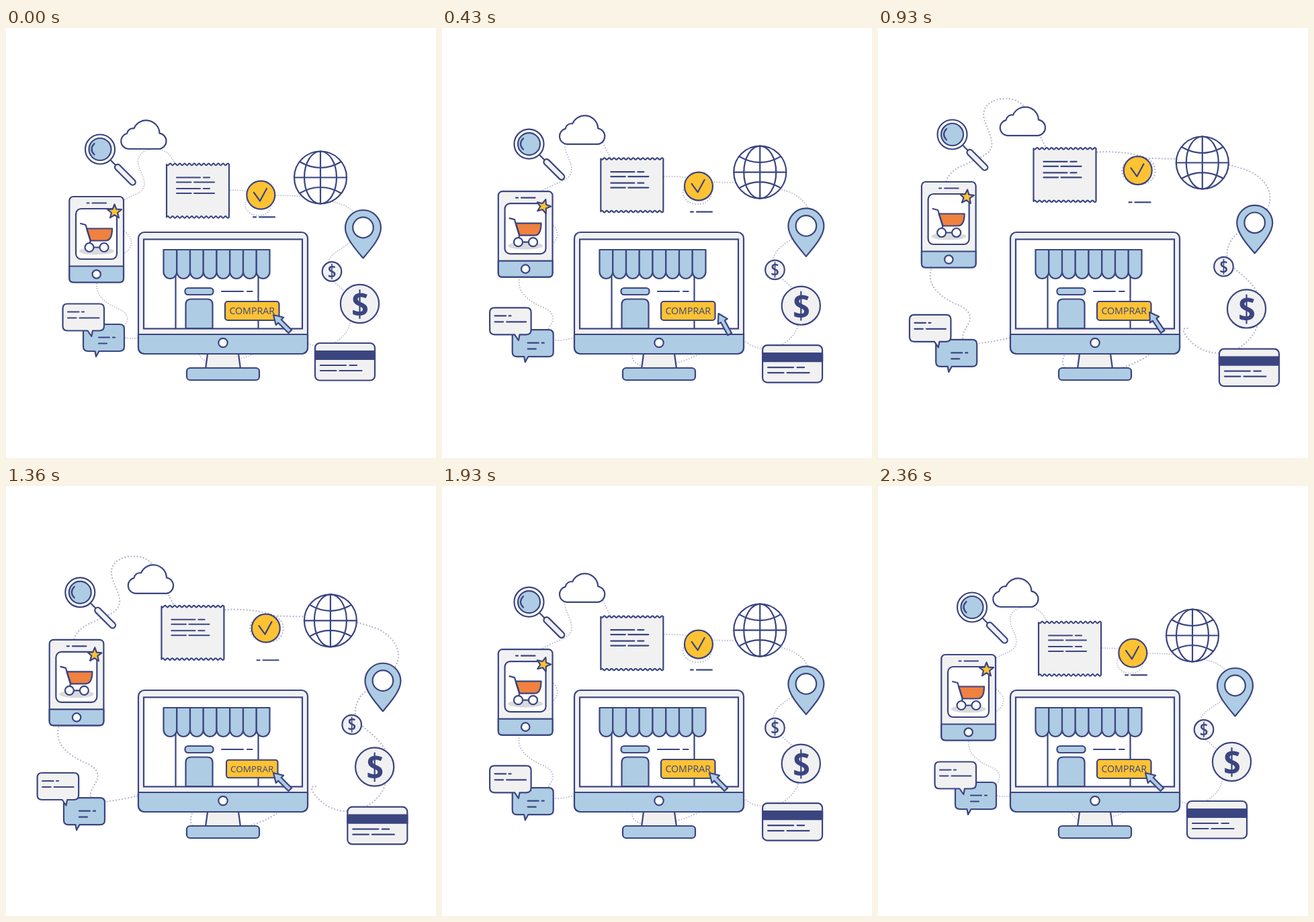
Recreate the animation shown at these times as an HTML page. Size 640 by 640 pixels, loop 2430 ms.

```html
<!DOCTYPE html>
<html lang="pt">
<head>
<meta charset="utf-8">
<title>Comprar</title>
<style>
html, body { margin: 0; width: 100%; height: 100%; overflow: hidden; background: #fff; }
svg { display: block; width: 100vw; height: 100vh; }
.ink { fill: none; stroke: #3b4580; stroke-width: 2.2; stroke-linecap: round; stroke-linejoin: round; }
.b { fill: #aecce3; }
.g { fill: #f1f1f2; }
.w { fill: #fff; }
.y { fill: #fec233; }
.o { fill: #f0813f; }
.navy { fill: #3b4580; }
text { fill: #3b4580; stroke: none; text-anchor: middle; font-family: "Open Sans", "Noto Sans", sans-serif; }
</style>
</head>
<body>
<svg viewBox="0 0 640 640">
  <path id="trail" fill="none" stroke="#b9bad2" stroke-width="2.4" stroke-linecap="round" stroke-dasharray="0 4.6"
    d="M461 447C452 446 455 453 460 460C472 475 488 484 508 484C522 484 530 482 537 477C555 466 566 450 566 435
    C566 415 570 400 562 388C552 374 540 365 530 357C516 345 518 328 528 313C540 298 568 288 579 270
    C592 248 580 226 555 213C535 205 520 202 500 199C480 196 460 194 443 194L400 193C385 192.5 368 194 364 207
    C360 222 376 236 398 231C416 226 418 203 402 194C385 185 350 182 325 184C290 188 262 192 250 178
    C243 164 238 152 228 134C222 118 211 104 190 104C167 104 154 117 157 132C160 148 169 158 169 172
    C167 190 150 191 130 202C108 210 98 224 100 238C106 252 144 262 144 285C144 310 82 325 77 365
    C75 388 96 402 118 412C134 418 139 428 135 438C128 452 112 470 148 470Q175 466 197 461
    M284 476C274 488 268 505 288 513C305 518 335 515 353 509Q385 500 405 486"/>
  <g class="ink">
    <!-- monitor -->
    <path class="g" d="M300 485L297 507H349L346 485"/>
    <rect class="b" x="269" y="506" width="108" height="18" rx="5"/>
    <rect class="g" x="197" y="304" width="252" height="181" rx="9"/>
    <path class="b" d="M197 456H449V476A9 9 0 0 1 440 485H206A9 9 0 0 1 197 476Z"/>
    <rect class="w" x="205" y="314.5" width="236" height="133" stroke-linejoin="miter"/>
    <circle class="w" cx="323" cy="468.5" r="6.7"/>
    <!-- shop -->
    <path d="M252.5 369V447M375.5 369V447M321 392H353M359 392H366.5"/>
    <g id="awning" class="b"></g>
    <rect class="b" x="266.5" y="387" width="42" height="10" rx="4.5"/>
    <path class="b" d="M267.5 447V411.5Q267.5 403.5 275.5 403.5H299.500Q307.500 403.500 307.500 411.500V447Z"/>
    <g id="buy">
      <rect class="y" x="326" y="407" width="80.500" height="28" rx="4"/>
      <text x="366.200" y="426.200" font-size="14.200">COMPRAR</text>
    </g>
    <path id="cursor" class="b" d="M0 0L8 13.300H3.300V35H-3.300V13.300H-8Z"/>

    <!-- search -->
    <g data-d="-29.9 -22.3">
      <path d="M156 197L166 207"/>
      <rect class="g" x="-4.300" y="0" width="8.600" height="40" rx="4.300" transform="translate(163.200 204.200) rotate(-45)"/>
      <circle class="w" cx="140" cy="180.500" r="22"/>
      <circle class="b" cx="140" cy="180.500" r="16.500"/>
      <path d="M131.500 172Q123.500 180.500 131.500 188.500"/>
    </g>
    <!-- cloud -->
    <g data-d="10.6 -20.200">
      <path class="w" d="M182 180H228A11.800 11.800 0 0 0 228.500 156.600A19.800 19.800 0 0 0 190.500 149.500A9 9 0 0 0 180 157A11.700 11.700 0 0 0 182 180Z"/>
    </g>
    <!-- receipt -->
    <g data-d="-7.6 -23.900">
      <path id="paper" class="g"/>
      <path d="M254 222.500H289M294 222.500H303M254 229.500H275.500M280 229.500H310M254 239H289M294 239H303M254 246H275.500M280 246H310"/>
    </g>
    <!-- confirmation -->
    <g data-d="7.5 -37.100">
      <circle class="y" cx="379.300" cy="248.600" r="21"/>
      <path d="M369 245L378 257.500L388 239"/>
    </g>
    <path data-d="5.6 -22.300" d="M368 281.400H372M377 281.400H400"/>
    <!-- globe -->
    <g data-d="15 -22.300">
      <circle class="w" cx="468" cy="222.500" r="39"/>
      <ellipse cx="468" cy="222.500" rx="24" ry="39"/>
      <path d="M429 222.500H507M468 183.500V261.500M437 199Q468 217 499 199M437 246Q468 228 499 246"/>
    </g>
    <!-- pin -->
    <g data-d="29.6 -7.300">
      <path class="b" d="M531.500 342.500C520 329 505 312 505 297.500A26.500 26.500 0 0 1 558 297.500C558 312 543 329 531.500 342.500Z"/>
      <circle class="w" cx="531.500" cy="297" r="15.300"/>
    </g>
    <!-- coins -->
    <g data-d="29.9 -7.400">
      <circle class="g" cx="485" cy="362.500" r="14.300"/>
      <text x="485" y="370.800" font-size="23" font-weight="600">S</text>
      <path d="M485 351.500V373.500" stroke-width="1.600"/>
    </g>
    <g data-d="22.3 7.500">
      <circle class="g" cx="526.500" cy="410.500" r="28.600"/>
      <text x="527" y="428" font-size="47" font-weight="700">S</text>
      <path d="M526.500 390V432"/>
    </g>
    <!-- card -->
    <g data-d="48.6 8.700">
      <rect class="g" x="460" y="469" width="89" height="55.500" rx="7"/>
      <path class="navy" d="M460 481H549V493H460Z"/>
      <path d="M468 502H506M511.500 502H522M468 510H491.500M496.500 510H529.500"/>
    </g>
    <!-- chat -->
    <g data-d="-29.2 23.300">
      <path class="b" d="M122 441H169Q176 441 176 448V474Q176 481 169 481H138.500L134 489L132.500 481H122Q115 481 115 474V448Q115 441 122 441Z"/>
      <path d="M138 460.500H154M159 460.500H162M138 469.500H150"/>
    </g>
    <g data-d="-38.1 16.600">
      <path class="g" d="M91.500 410.500H139Q146 410.500 146 417.500V443.500Q146 450.500 139 450.500H129L127.300 459L121.500 450.500H91.500Q84.500 450.500 84.500 443.500V417.500Q84.500 410.500 91.500 410.500Z"/>
      <path d="M92 422.500H108.500M113 422.500H116M92 431.500H104.500M109.500 431.500H138.500"/>
    </g>
    <!-- phone -->
    <g data-d="-29.8 -22.300">
      <rect class="g" x="94.300" y="251" width="80.700" height="127.500" rx="6"/>
      <path class="b" d="M94.300 354.500H175V372.500Q175 378.500 169 378.500H100.300Q94.300 378.500 94.300 372.500Z"/>
      <circle class="w" cx="134.700" cy="366.500" r="6.200"/>
      <path d="M120.500 260.500H123.500M128.500 260.500H149"/>
      <rect class="w" x="104" y="269" width="61" height="75" rx="8"/>
      <ellipse cx="134.700" cy="332" rx="26" ry="5.500" fill="#d9dadd" stroke="none"/>
      <path class="o" d="M120 298.500H158C158 308 156 316.500 148 316.500H125.500Z"/>
      <path d="M111 291L118.500 293L126 316.500L124 321M124 326.500H146"/>
      <circle class="w" cx="124" cy="326.500" r="6.500"/>
      <circle class="w" cx="146" cy="326.500" r="6.500"/>
      <polygon id="star" class="y"/>
    </g>
  </g>
</svg>
<script>
const LOOP = 2430, STEPS = 34;
const $ = id => document.getElementById(id);
const place = (el, v) => el.setAttribute('transform', v);
const movers = [...document.querySelectorAll('[data-d]')]
  .map(el => [el, ...el.dataset.d.split(' ').map(Number)]);

let stripes = '';
for (let i = 0; i < 8; i++)
  stripes += `<path d="M${234.5 + i * 19.75} 330h19.75v33a9.875 10 0 0 1-19.75 0z"/>`;
$('awning').innerHTML = stripes;

const wave = dir => `q${1.79 * dir} 2.6 ${3.577 * dir} 0t${3.577 * dir} 0`.repeat(13);
$('paper').setAttribute('d', 'M239 203' + wave(1) + 'V281.500' + wave(-1) + 'Z');

$('star').setAttribute('points', Array.from({length: 10}, (_, i) => {
  const r = i % 2 ? 4.8 : 11, a = i * Math.PI / 5;
  return `${r * Math.sin(a)},${-r * Math.cos(a)}`;
}).join(' '));

// Cubic Bezier easing with handles (.72, 0) and (0, 1)
function ease(x) {
  if (x >= 1) return 1;
  let lo = 0, hi = 1;
  for (let n = 0; n < 30; n++) {
    const s = (lo + hi) / 2;
    if (2.16 * (1 - s) ** 2 * s + s ** 3 < x) lo = s; else hi = s;
  }
  return 3 * lo ** 2 - 2 * lo ** 3;
}

function draw(now) {
  const i = Math.floor((now % LOOP) * STEPS / LOOP + .1) % STEPS;
  const p = ease(Math.min(i, STEPS - 1 - i) / 16);

  for (const [el, dx, dy] of movers) place(el, `translate(${dx * p} ${dy * p})`);
  place($('trail'), `translate(331 436.5) scale(${(1 + .296 * p) / 1.296}) translate(-331 -436.5)`);
  place($('star'), `translate(161.5 273.500) rotate(${-360 * p})`);

  // The cursor swings away, returns and clicks
  const a = i < 17.5 ? Math.sin(Math.PI * i / 17.5) ** 2 / .775 : 0;
  place($('cursor'), `translate(${398 + 13.5 * a * a} ${427 - 14 * a + 12 * a * a}) rotate(${-45 + 16.5 * a})`);
  const press = 1 - .05 * Math.max(0, 1 - Math.abs(i - 19) / 2.5);
  place($('buy'), `translate(366.2 421) scale(${press}) translate(-366.2 -421)`);

  requestAnimationFrame(draw);
}
draw(performance.now());
</script>
</body>
</html>
```
